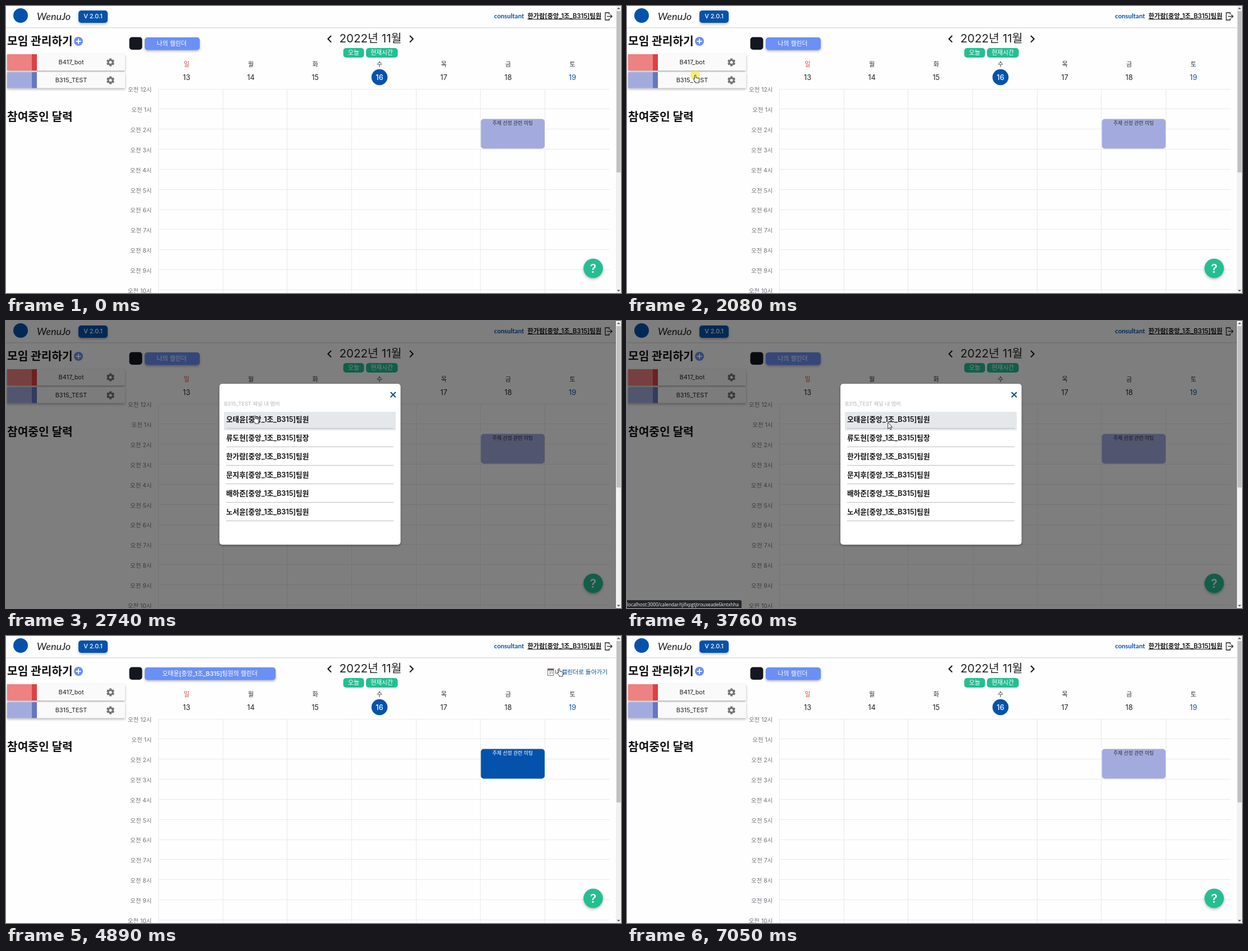
Animation of 1095x512 px, one loop 7.32 s. Source, as an HTML page with a canvas:

```html
<!DOCTYPE html>
<html lang="ko">
<head>
<meta charset="utf-8">
<title>Team calendar</title>
<style>
html, body { margin: 0; width: 100%; height: 100%; overflow: hidden; background: #fff; }
canvas { display: block; width: 1095px; height: 512px; }
</style>
</head>
<body>
<canvas id="stage"></canvas>
<script>
const W = 1095, H = 512, LOOP = 7320;
const canvas = document.getElementById('stage');
const g = canvas.getContext('2d');
const dpr = window.devicePixelRatio || 1;
canvas.width = W * dpr;
canvas.height = H * dpr;

const SANS = 'Inter, "Noto Sans CJK KR", "Noto Sans CJK JP", sans-serif';
const NAVY = '#0452ab', SKY = '#6b90f5', GREEN = '#25be93', LILAC = '#a3abde', HOVER = '#e4e8ea', GRID = '#e9e9e9';
const GX = 271.5, GY = 148, CW = 114.65, RH = 35.85;

const TEAM = '[중앙_1조_B315]';
const ME = `한가람${TEAM}팀원`;
const PEER = `오태윤${TEAM}팀원`;
const MEMBERS = [PEER, `류도현${TEAM}팀장`, ME, `문지후${TEAM}팀원`, `배하준${TEAM}팀원`, `노서윤${TEAM}팀원`];
const URL_ME = 'localhost:3000/calendar/okdad9z7tfgh5byfzri9i7eybh';
const URL_PEER = 'localhost:3000/calendar/tjifxpgtjtrouxeade6kntxhha';

// pointer path: time, x, y
const PATH = [
  [190, -6, 488], [430, 70, 390], [620, 130, 200], [900, 42, 10], [1520, 42, 10],
  [1990, 121.5, 123], [2340, 121.5, 123], [2740, 443, 169], [3040, 464.5, 181],
  [4620, 464.5, 181], [4890, 984.5, 58], [5260, 1026.5, 64], [6040, 1026.5, 64],
  [6310, 1033, 246], [7050, 1084, 516]
];
const CLICKS = [[1960, 2210], [3210, 3420], [5640, 5850]];
const BARS = [[1120, 1620, URL_ME, 211], [2930, 4690, URL_PEER, 204], [5290, 6140, URL_ME, 211]];

const ARROW = new Path2D('M0 0V11.5L2.7 9L4.6 13L6.3 12.2L4.5 8.4H8Z');
const HAND = new Path2D('M-1.2 .8C-1.2 -.2 1.2 -.2 1.2 .8V5L6 6Q7.3 6.4 7.2 8L6.5 12V14H.2V12.5L-3 8.5Q-3.4 7 -1.2 7.6Z');

function text(str, x, y, size, color = '#222', weight = 400, align = 'center', family = SANS) {
  g.font = `${weight} ${size}px ${family}`;
  g.textAlign = align;
  g.fillStyle = color;
  g.fillText(str, x, y + size * 0.36);
}

function rect(x, y, w, h, color) {
  g.fillStyle = color;
  g.fillRect(x, y, w, h);
}

function shade(blur, dy, alpha) {
  g.shadowColor = `rgba(0,0,0,${alpha})`;
  g.shadowBlur = blur * dpr;
  g.shadowOffsetY = dy * dpr;
}

function box(x, y, w, h, r, color, shadow) {
  g.save();
  if (shadow) shade(4, 2, 0.3);
  g.fillStyle = color;
  g.beginPath();
  g.roundRect(x, y, w, h, r);
  g.fill();
  g.restore();
}

function disc(x, y, r, color) {
  g.fillStyle = color;
  g.beginPath();
  g.arc(x, y, r, 0, 7);
  g.fill();
}

function line(points, color, width) {
  g.strokeStyle = color;
  g.lineWidth = width;
  g.beginPath();
  points.forEach(([x, y], i) => i ? g.lineTo(x, y) : g.moveTo(x, y));
  g.stroke();
}

// monotone cubic through the path points, so holds stay still
function pointer(t) {
  let i = 0;
  while (i < PATH.length - 2 && t >= PATH[i + 1][0]) i++;
  const a = PATH[i], b = PATH[i + 1], dt = b[0] - a[0];
  const u = Math.min(1, Math.max(0, (t - a[0]) / dt));
  const secant = (k, c) => PATH[k] && PATH[k + 1]
    ? (PATH[k + 1][c] - PATH[k][c]) / (PATH[k + 1][0] - PATH[k][0]) : 0;
  const slope = (k, c) => {
    const p = secant(k - 1, c), q = secant(k, c);
    return p * q > 0 ? 2 * p * q / (p + q) : 0;
  };
  return [1, 2].map(c => {
    const s = u * u * (3 - 2 * u);
    return a[c] + (b[c] - a[c]) * s
      + dt * u * (1 - u) * ((1 - u) * slope(i, c) - u * slope(i + 1, c));
  });
}

function stateAt(t) {
  const modal = t >= 2210 && t < 4020;
  const peer = t >= 4020 && t < 5850;
  const loading = (t >= 4020 && t < 4160) || (t >= 5850 && t < 5930);
  return { modal, peer, loading };
}

function header() {
  rect(0, 38, 1086, 1, '#dcdcdc');
  rect(0, 39, 1086, 1, '#f0f0f0');
  disc(26, 17, 13, NAVY);
  text('WenuJo', 55, 19, 18, '#1c1c1c', 'italic 400', 'left', 'Lato, sans-serif');
  box(129, 8, 52, 22, 5, NAVY, true);
  text('V 2.0.1', 155, 18.5, 10.8, '#fff', 500);
  text('consultant', 869, 18, 11.4, NAVY, 700, 'left', 'Lato, sans-serif');
  text(ME, 1060, 17.5, 11.25, '#111', 600, 'right');
  const w = g.measureText(ME).width;
  rect(1060 - w, 23, w, 1, '#111');
  line([[1074, 15], [1074, 12], [1067, 12], [1067, 25], [1074, 25], [1074, 22]], '#222', 1.3);
  line([[1070, 18.5], [1079, 18.5]], '#222', 1.3);
  line([[1076, 15.5], [1079, 18.5], [1076, 21.5]], '#222', 1.3);
}

function gear(x, y) {
  for (let i = 0; i < 6; i++) {
    g.save();
    g.translate(x, y);
    g.rotate(i * Math.PI / 3);
    rect(-2, -7, 4, 4, '#747474');
    g.restore();
  }
  disc(x, y, 5.4, '#747474');
  disc(x, y, 2.5, '#fafafa');
}

function channel(y, h, name, light, dark) {
  box(2, y, 210, h, 1, '#fafafa', true);
  rect(2, y, 44, h, light);
  rect(46, y, 9, h, dark);
  text(name, 116, y + 14.5, 10.9, '#222');
  gear(186, y + 14.5);
}

function sidebar(loading) {
  if (loading) {
    for (const y of [115, 194]) text('Loading', 107, y, 13.3, '#111', 700);
    for (const y of [63.5, 142]) rect(119, y, 3, 1, SKY);
    return;
  }
  text('모임 관리하기', 2, 63, 20.3, '#111', 700, 'left');
  disc(129, 63, 8, SKY);
  line([[124.5, 63], [133.5, 63]], '#fff', 2);
  line([[129, 58.5], [129, 67.5]], '#fff', 2);
  channel(86, 29, 'B417_bot', '#ee8182', '#dc4144');
  channel(118, 28.5, 'B315_TEST', LILAC, '#6677c1');
  text('참여중인 달력', 2, 198, 20.3, '#111', 700, 'left');
}

function toolbar({ peer, loading }) {
  box(219.5, 55.5, 23, 22.5, 5, '#14171f');
  const w = peer ? 233 : 98;
  box(247, 56, w, 22.5, 5, SKY, true);
  const owner = peer ? (loading ? '의' : PEER + '의') : '나의';
  text(owner + ' 캘린더', 247 + w / 2 - (peer ? 0.5 : 1), 67, 10.9, '#fff', 500);

  line([[579, 53], [573.3, 58.8], [579, 64.6]], '#111', 2);
  line([[719, 53], [724.7, 58.8], [719, 64.6]], '#111', 2);
  text('2022년 11월', 649, 58, 20.6, '#222');
  box(600.5, 75, 37, 17, 5, GREEN);
  text('오늘', 619, 83.5, 10.8, '#fff', 500);
  box(641, 75, 56.5, 17, 5, GREEN);
  text('현재시간', 669, 83.5, 10.8, '#fff', 500);

  if (peer) {
    box(964, 58, 11.5, 13, 1, '#6b6f73');
    rect(965, 61.5, 9.5, 8.5, '#fff');
    rect(964, 58, 11.5, 2.5, '#80604f');
    text('31', 969.8, 66, 6.5, '#444');
    text('내 캘린더로 돌아가기', 977, 64, 10.7, '#064b9e', 500, 'left');
  }
}

function calendar({ peer, loading }, cell) {
  [...'일월화수목금토'].forEach((name, i) => {
    const x = 321.5 + i * 114.5;
    text(name, x, 104.5, 11, i ? '#333' : '#d8463f');
    if (i === 3) disc(x, 127, 14.3, NAVY);
    text(13 + i, x, 127, 12.7, i === 3 ? '#fff' : i === 6 ? NAVY : '#222', i === 3 ? 500 : 400);
  });
  if (cell) rect(GX + cell[0] * CW, GY + cell[1] * RH, CW, RH, HOVER);
  for (let r = 0; r <= 10; r++) {
    const y = GY + r * RH;
    rect(271, Math.floor(y), 804, 1, GRID);
    text(`오전 ${r || 12}시`, 259.5, y + 1.5, 10.5, '#70757a', 400, 'right');
  }
  for (let c = 0; c < 7; c++) rect(Math.floor(GX + c * CW), GY, 1, H - GY, GRID);
  if (!loading) {
    box(845.5, 201.5, 113.5, 53, 5, peer ? NAVY : LILAC);
    text('주제 선정 관련 미팅', 902, 208.5, 8.8, peer ? '#fff' : '#333');
  }
}

function help() {
  g.save();
  shade(5, 2, 0.3);
  disc(1045.5, 468, 17.3, GREEN);
  g.restore();
  text('?', 1045.5, 468, 21, '#fff', 600);
}

function triangle(x, y, d) {
  g.fillStyle = '#555';
  g.beginPath();
  g.moveTo(x - 3, y + d);
  g.lineTo(x, y - 2 * d);
  g.lineTo(x + 3, y + d);
  g.fill();
}

function scrollbar(loading) {
  rect(1086, 0, 9, H, '#f1f1f1');
  rect(1087, 9, 7.5, loading ? 298 : 288, '#c1c1c1');
  triangle(1090.7, 4.5, 1);
  triangle(1090.7, 507.5, -1);
}

function dialog(x, y) {
  rect(0, 0, 1086, H, 'rgba(0,0,0,.5)');
  box(380, 112, 322.5, 287, 5, '#fff', true);
  line([[684.7, 127], [693.8, 136]], '#0b4f87', 2);
  line([[693.8, 127], [684.7, 136]], '#0b4f87', 2);
  text('B315_TEST 채널 내 멤버', 388.5, 147.5, 9.3, '#b8b8b8', 400, 'left');
  MEMBERS.forEach((name, i) => {
    const top = 162 + i * 33;
    if (x > 388 && x < 694 && y > top && y < top + 33) rect(388, top, 306, 33, HOVER);
    text(name, 392, top + 13.5, 12.6, '#111', 600, 'left');
    rect(392, top + 29, 298, 1, '#bcbcbc');
  });
}

function statusBar(t) {
  for (const [start, end, url, width] of BARS) {
    const a = Math.min((t - start) / 200, (end - t) / 140, 1);
    if (a <= 0) continue;
    g.globalAlpha = a;
    box(0, 498, width, 14, [0, 3, 0, 0], '#25262a');
    text(url, 0, 506, 8.25, '#f2f2f2', 400, 'left', '"Open Sans", sans-serif');
    g.globalAlpha = 1;
  }
}

const overHelp = (x, y) => Math.hypot(x - 1045.5, y - 468) < 17.3;

function overLink(x, y, { modal, peer, loading }) {
  if (modal) return x > 388 && x < 694 && y > 162 && y < 360;
  return (y < 32 && x > 4 && x < 116)
    || (!loading && x < 212 && ((y > 86 && y < 115) || (y > 118 && y < 147)))
    || (peer && x > 963 && x < 1072 && y > 55 && y < 73)
    || overHelp(x, y);
}

function cursor(t, x, y, state) {
  for (const [start, end] of CLICKS) {
    if (t < start || t >= end) continue;
    const p = (t - start) / (end - start);
    disc(x, y + 0.5, 8.5, `rgba(246,232,50,${0.85 - 0.4 * p})`);
  }
  const waiting = t >= 3760 && t < 4620;
  const shape = !waiting && overLink(x, y, state) ? HAND : ARROW;
  g.save();
  g.translate(x, y);
  g.fillStyle = '#fff';
  g.fill(shape);
  g.strokeStyle = '#222';
  g.lineWidth = 0.9;
  g.stroke(shape);
  g.restore();
}

function draw(t) {
  const state = stateAt(t);
  const shown = t >= 190 && t < 7050;
  const [x, y] = shown ? pointer(t) : [-50, -50];
  const inGrid = !state.modal && x > GX && x < 1074 && y > GY && y < H && !overHelp(x, y);
  const cell = inGrid && [Math.floor((x - GX) / CW), Math.floor((y - GY) / RH)];

  g.setTransform(dpr, 0, 0, dpr, 0, 0);
  rect(0, 0, W, H, '#fefefe');
  header();
  sidebar(state.loading);
  toolbar(state);
  calendar(state, cell);
  help();
  if (state.modal) dialog(x, y);
  scrollbar(state.loading);
  statusBar(t);
  if (shown) cursor(t, x, y, state);
}

const began = performance.now();
function tick() {
  draw((performance.now() - began) % LOOP);
  requestAnimationFrame(tick);
}
tick();
</script>
</body>
</html>
```
